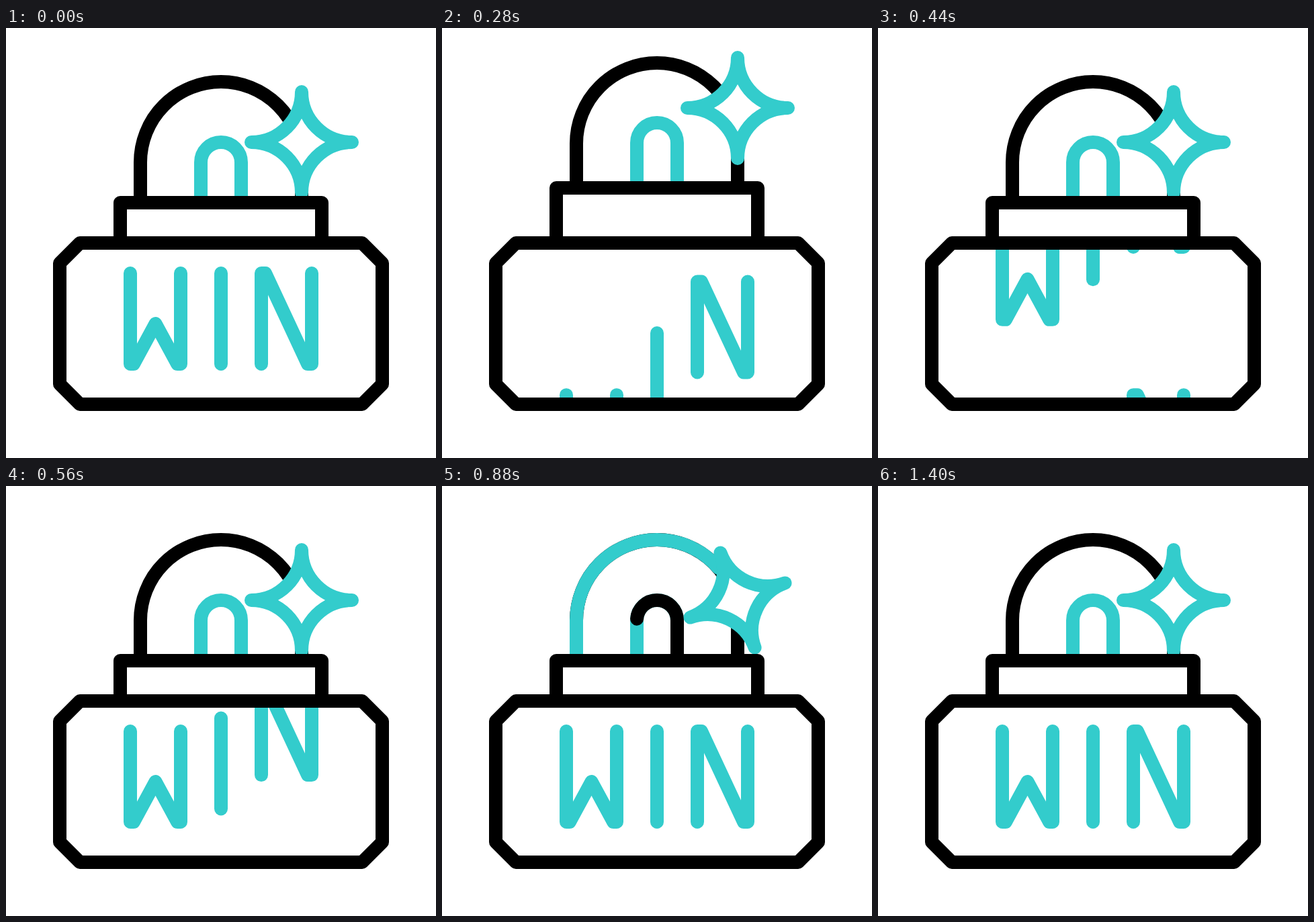
Animation, 640 px wide and 640 px high, one loop 1.48 s. Source, as an HTML page:

```html
<!DOCTYPE html>
<html lang="en">
<head>
<meta charset="utf-8">
<title>Win</title>
<style>
  html, body { margin: 0; width: 100%; height: 100%; overflow: hidden; background: #fff; }
  svg { display: block; width: 100%; height: 100%; fill: none; stroke-width: 20; stroke-linejoin: round; }
  .ink { stroke: #000; }
  .teal { stroke: #3cc; }
  .round { stroke-linecap: round; }
  .paper { fill: #fff; }
</style>
</head>
<body>
<svg viewBox="0 0 640 640">
  <defs>
    <clipPath id="window"><rect x="80" y="320" width="480" height="240"/></clipPath>
    <clipPath id="sweep"><rect id="sweepBox" x="193" y="0" width="447" height="640"/></clipPath>
    <path id="w" d="M185 365V500H190L222.5 440L255 500H260V365"/>
    <path id="i" d="M320 365V500"/>
    <path id="n" d="M380 500V365H386L449 500H455V365"/>
  </defs>

  <path id="dome" class="ink" d="M200 260V200A120 120 0 0 1 440 200V260"/>
  <g id="domeMask">
    <path id="domeTrim" class="teal round" d="M200 260V200A120 120 0 0 1 440 200V260"/>
  </g>
  <path id="arch" class="teal" d="M290 260V200A30 30 0 0 1 350 200V260"/>
  <path id="star" class="teal paper"
    d="M440 95A75 75 0 0 0 515 170A75 75 0 0 0 440 245A75 75 0 0 0 365 170A75 75 0 0 0 440 95Z"/>
  <path id="collar" class="ink paper round"/>
  <path id="archTrim" class="ink round" d="M350 260V200A30 30 0 0 0 290 200V260"/>

  <g id="letters" class="teal round" clip-path="url(#window)"></g>
  <path class="ink" d="M110 320H530L560 350V530L530 560H110L80 530V350Z"/>
</svg>

<script>
const LOOP = 1480, STEP = 40;
const $ = id => document.getElementById(id);

// Eased progress of a move that starts at `from` and lasts `span`
const ease = (t, from, span) => {
  const p = Math.min(1, Math.max(0, (t - from) / span));
  return p * p * (3 - 2 * p);
};

const shift = (el, x, y) => el.setAttribute('transform', `translate(${x} ${y})`);

// Each letter leaves downwards while its copy drops in from above
const letters = ['w', 'i', 'n'].map(id => [0, 1].map(() => {
  const use = document.createElementNS('http://www.w3.org/2000/svg', 'use');
  use.setAttribute('href', '#' + id);
  return $('letters').appendChild(use);
}));

function drawLetters(t) {
  letters.forEach(([old, fresh], k) => {
    const fall = ease(t, 80 + 80 * k, 280);
    const drop = ease(t, 264 + 62 * k, 292);
    shift(old, 0, 226 * fall);
    old.style.display = fall < 1 ? '' : 'none';
    shift(fresh, 0, -190 * (1 - drop));
    fresh.style.display = drop > 0 ? '' : 'none';
  });
}

function drawTop(t) {
  const up = ease(t, 80, 200);
  const hop = up - ease(t, 280, 146);
  const lean = 0.7 * (ease(t, 280, 80) - ease(t, 360, 66));
  const y = 260 - 22 * hop;
  $('collar').setAttribute('d', `M170 320L${170 + lean} ${y}H${470 + lean}L470 320`);
  shift($('arch'), 0, -29 * hop);
  shift($('dome'), 0, -28 * up + 33 * ease(t, 280, 100) - 5 * ease(t, 380, 60));
  $('star').setAttribute('transform',
    `translate(0 ${-51 * hop}) rotate(${360 * ease(t, 640, 280)} 440 170)`);
}

function trim(path, start, end, shown) {
  const len = path.getTotalLength();
  path.style.display = shown && end > start ? '' : 'none';
  path.setAttribute('stroke-dasharray', `${(end - start) * len} 2000`);
  path.setAttribute('stroke-dashoffset', -start * len);
}

function drawTrims(t) {
  const end = ease(t, 520, 560), start = ease(t, 840, 560);
  const dome = $('domeTrim');
  trim(dome, start, end, t > 560);
  trim($('archTrim'), start, end, t > 560);

  // The growing sweep is cut off straight at its tip
  const tip = dome.getPointAtLength(end * dome.getTotalLength()).x;
  $('sweepBox').setAttribute('width', Math.max(210, tip) - 193);
  if (t < 840) $('domeMask').setAttribute('clip-path', 'url(#sweep)');
  else $('domeMask').removeAttribute('clip-path');
}

function draw(now) {
  const t = Math.floor(now % LOOP / STEP) * STEP;
  drawTop(t);
  drawTrims(t);
  drawLetters(t);
}

const born = performance.now();
function tick() {
  draw(performance.now() - born);
  requestAnimationFrame(tick);
}
tick();
</script>
</body>
</html>
```
